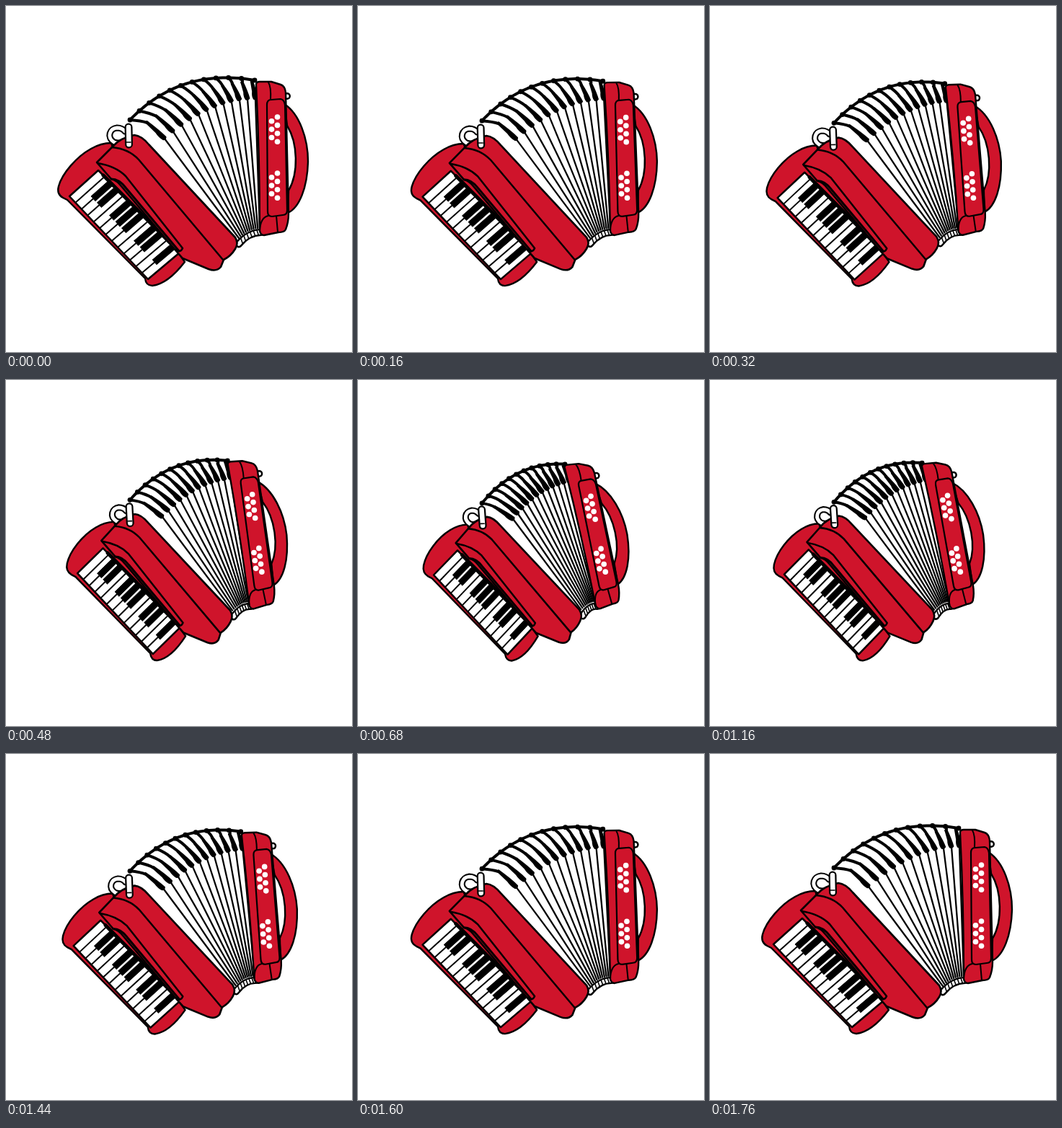
An HTML page with a canvas that plays this animation: 480x480 px, repeating every 1800 ms.

```html
<!DOCTYPE html>
<html lang="en">
<head>
<meta charset="utf-8">
<title>Accordion</title>
<style>
html, body { margin: 0; width: 100%; height: 100%; overflow: hidden; background: #fff; }
canvas { display: block; width: 480px; height: 480px; }
</style>
</head>
<body>
<canvas id="stage" width="480" height="480"></canvas>
<script>
const ctx = document.getElementById('stage').getContext('2d');
const RED = '#cf142b', INK = '#000', WHITE = '#fff';
const LOOP = 1800, STEP = 40, TURN = 880;
const FOLDS = 12;
let squeeze = 0; // 0 = bellows open, about 1 = closed

const mix = (a, b, t) => a + (b - a) * t;
const mixPt = (a, b, t) => [mix(a[0], b[0], t), mix(a[1], b[1], t)];

// Each half of the instrument bends by a smooth function of its place.
function left(x, y) {
  const s = (x + y - 350) / 260, v = (x - y + 180) / 173;
  return [x + squeeze * (19 - 9 * s - 17 * v - 3 * s * v),
          y + squeeze * (7 - 5.8 * s + 5 * v - 7.2 * s * v)];
}
function right(x, y) {
  const s = (y - 107) / 205, v = (x - 348) / 40;
  return [x + squeeze * (-66 + 42 * s - 2 * v - 2.5 * s * v),
          y + squeeze * (14 - 13 * s - 4 * v - 2 * s * v)];
}

// Builds a path from M, L, Q, C, Z commands with every point bent.
function trace(d, bend) {
  const ops = { M: 'moveTo', L: 'lineTo', Q: 'quadraticCurveTo', C: 'bezierCurveTo', Z: 'closePath' };
  ctx.beginPath();
  for (const [, op, rest] of d.matchAll(/([MLQCZ])([^MLQCZ]*)/g)) {
    const n = (rest.match(/[\d.]+/g) || []).map(Number), pts = [];
    for (let i = 0; i < n.length; i += 2) pts.push(...bend(n[i], n[i + 1]));
    ctx[ops[op]](...pts);
  }
}
function ink(width, color = INK) {
  ctx.lineWidth = width;
  ctx.strokeStyle = color;
  ctx.stroke();
}
function fill(color) {
  ctx.fillStyle = color;
  ctx.fill();
}
function shape(d, bend, color, width = 2.4) {
  trace(d, bend);
  fill(color);
  if (width) ink(width);
}
function stroke(d, bend, width, color) {
  trace(d, bend);
  ink(width, color);
}
function tube(d, bend, outer, inner) {
  stroke(d, bend, outer);
  stroke(d, bend, inner, WHITE);
}
function poly(pts) {
  ctx.beginPath();
  pts.forEach(p => ctx.lineTo(...p));
  ctx.closePath();
}
function dot(p, r, color) {
  ctx.beginPath();
  ctx.arc(...p, r, 0, Math.PI * 2);
  fill(color);
}

// Quadratic curves (start, control, end) for the open and closed bellows.
const RIM = [[[172, 158], [242, 85], [345, 103]], [[172, 172], [218, 115], [282, 118]]];
const KNEE = [[[196, 162], [267, 111], [341, 105]], [[190, 178], [231, 131], [280, 121]]];
const TIP = [[[220, 184], [286, 128], [346, 129]], [[215, 194], [247, 151], [289, 143]]];
const FOOT = [[[323, 322], [336, 308], [352, 308]], [[308, 318], [320, 305], [329, 307]]];

function along(curve, t) {
  const [a, b, c] = curve[0].map((p, i) => mixPt(p, curve[1][i], squeeze));
  return mixPt(mixPt(a, b, t), mixPt(b, c, t), t);
}

function bellows() {
  const ts = Array.from({ length: FOLDS }, (_, i) => i / (FOLDS - 1));
  const rim = ts.map(t => along(RIM, t));
  poly([left(174, 176), ...rim, right(350, 108), right(354, 314), left(320, 330)]);
  fill(WHITE);

  ctx.beginPath();
  for (let i = 0; i <= 40; i++) ctx.lineTo(...along(RIM, i / 40));
  ink(4);

  ts.forEach((t, i) => {
    const knee = along(KNEE, t), tip = along(TIP, t), foot = along(FOOT, t);
    const dx = tip[0] - knee[0], dy = tip[1] - knee[1], len = Math.hypot(dx, dy);
    const nx = -dy / len, ny = dx / len;
    const at = (f, w) => [knee[0] + dx * f + nx * w, knee[1] + dy * f + ny * w];

    dot(rim[i], 3.4, INK);
    ctx.beginPath();
    ctx.moveTo(...rim[i]);
    ctx.quadraticCurveTo(...mixPt(rim[i], at(0, -3), 0.6), ...knee);
    ink(4);

    ctx.beginPath();
    ctx.moveTo(...at(-0.08, 2));
    ctx.lineTo(...at(0.55, 2.6));
    ctx.quadraticCurveTo(...at(0.8, 4.6), ...at(1, 3));
    ctx.quadraticCurveTo(...at(1.12, 0), ...at(1, -3.6));
    ctx.quadraticCurveTo(...at(0.6, -4.2), ...at(-0.08, -2));
    ctx.closePath();
    fill(INK);

    ctx.beginPath();
    ctx.moveTo(...tip);
    ctx.lineTo(...foot);
    ink(2.3);
  });

  // Gathered lower rim
  tube('M323 331L330 323', left, 9, 5);
  const a = left(323, 330), b = right(354, 314), c = [mix(a[0], b[0], 0.45), mix(a[1], b[1], 0.5) - 8];
  for (const [w, color] of [[10, INK], [5.5, WHITE]]) {
    ctx.beginPath();
    ctx.moveTo(...a);
    ctx.quadraticCurveTo(...c, ...b);
    ink(w, color);
  }
  for (let i = 1; i < 7; i++) {
    const p = mixPt(mixPt(a, c, i / 7), mixPt(c, b, i / 7), i / 7);
    ctx.beginPath();
    ctx.moveTo(p[0] - 1.5, p[1] - 4);
    ctx.lineTo(p[0] + 1, p[1] + 3);
    ink(1.6);
  }
}

function buttonSide() {
  shape('M386 136C407 149 419 184 419 216C418 252 407 280 391 287L392 256C406 232 405 190 390 166Z', right, RED);
  const knob = right(390, 125);
  dot(knob, 5, INK);
  dot(knob, 2.5, WHITE);
  shape('M347 109Q347 105 352 105L368 105L381 109Q387 111 388 120L392 288Q392 300 388 310Q386 314 378 314L358 318Q353 318 352 312Q352 210 347 109Z', right, RED);
  stroke('M364 106Q368 112 367 130M352 312Q353 293 364 291M375 291L377 314', right, 2);
  shape('M362 137Q362 130 368 130L381 129Q386 130 387 137L390 283Q390 290 384 290L369 292Q363 292 363 285Z', right, RED, 2.2);
  for (const top of [154, 232]) {
    for (let i = 0; i < 7; i++) {
      const inner = i % 2;
      dot(right(inner ? 368.5 : 376.5, top + i * 5.7), 3.8, WHITE);
    }
  }
}

function keyboard() {
  shape('M146 190Q132 190 118 198C98 209 78 232 73 250Q70 261 79 266L85 269L193 378Q194 388 203 388C221 386 238 368 248 355L160 230Z', left, RED);
  const at = (t, u) => left(mix(mix(88, 128, u), mix(197, 241, u), t),
                            mix(mix(264, 228, u), mix(379, 342, u), t));
  const keys = 13;
  poly([at(0, 0), at(0, 1), at(1, 1), at(1, 0)]);
  fill(WHITE);
  ink(2.5);
  for (let i = 1; i < keys; i++) {
    ctx.beginPath();
    ctx.moveTo(...at(i / keys, 0));
    ctx.lineTo(...at(i / keys, 1));
    ink(2);
  }
  for (const k of [2, 3, 5, 6, 7, 9, 10, 12]) {
    const a = (k - 0.36) / keys, b = (k + 0.36) / keys;
    poly([at(a, 0.4), at(a, 1), at(b, 1), at(b, 0.4)]);
    fill(INK);
    ink(1);
  }
  ctx.beginPath();
  ctx.moveTo(...at(0.06, 1));
  ctx.lineTo(...at(1, 1));
  ink(5);
}

function body() {
  tube('M165 187Q158 192 150 189C139 182 144 170 154 169Q161 169 165 174', left, 9, 4.8);
  shape('M126 217L148 195Q158 183 178 179Q188 180 198 192L318 321Q323 329 318 337Q312 347 302 352L298 362Q292 369 281 365L245 350L237 341L160 250Q154 242 146 240Z', left, RED, 2.6);
  stroke('M147 196Q170 198 184 213L301 352', left, 2.5);
  stroke('M127 218Q152 222 166 236L245 336Q242 343 235 338', left, 2.5);
  stroke('M146 240Q157 240 166 252L240 340', left, 3);
  tube('M170 168L170.5 192', left, 11, 6.5);
  stroke('M167 189L173 189', left, 1.6);
}

function draw(now) {
  const t = Math.floor((now % LOOP) / STEP) * STEP;
  squeeze = 1.047 * (1 - Math.cos(Math.PI * t / TURN)) / 2;
  ctx.fillStyle = WHITE;
  ctx.fillRect(0, 0, 480, 480);
  ctx.lineJoin = ctx.lineCap = 'round';
  bellows();
  buttonSide();
  keyboard();
  body();
  requestAnimationFrame(draw);
}
draw(performance.now());
</script>
</body>
</html>
```
